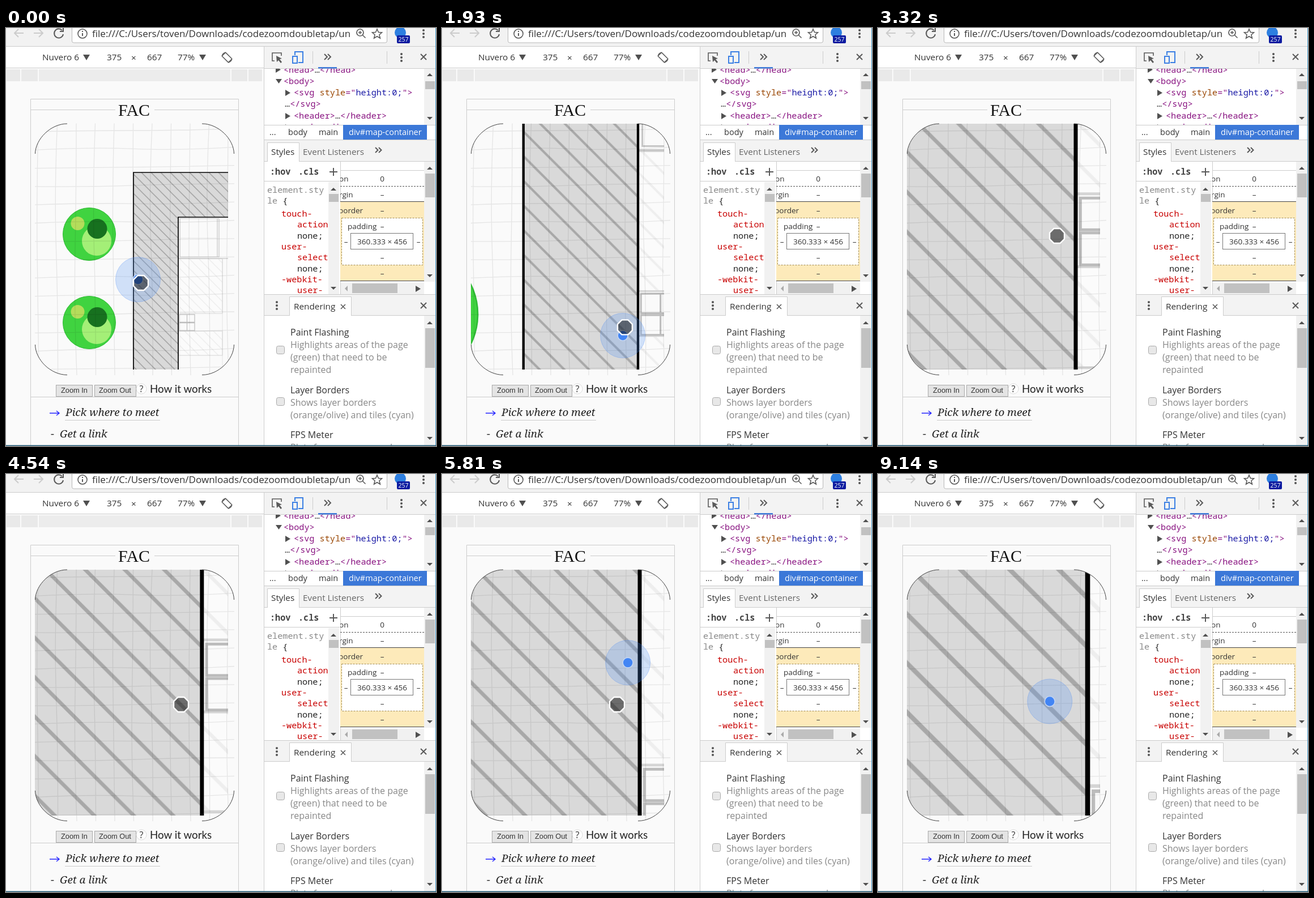
Animation, 759 px wide and 738 px high, one loop 9.17 s. Source, as an HTML page:

```html
<!DOCTYPE html>
<html lang="en">
<head>
<meta charset="utf-8">
<title>Map zoom</title>
<style>
  html, body { margin: 0; width: 100%; height: 100%; overflow: hidden; }
  svg { display: block; }
  text { font: 16px "Open Sans", sans-serif; fill: #333; }
  .bar text { font-size: 15.3px; }
  .url { font-size: 17px; }
  .crumb text { font-size: 14.5px; }
  .code text { font: 15.2px "Noto Sans Mono", monospace; fill: #222; }
  .code .tag { fill: #881280; }
  .code .attr { fill: #994500; }
  .code .value { fill: #1a1aa6; }
  .code .prop { fill: #c80000; }
  .code .dim { fill: #888; }
  .code .bold { font-weight: bold; fill: #444; }
  .box text { font-size: 13.5px; }
  .mid { text-anchor: middle; }
  .note text { fill: #888; }
  .button { font: 12.8px "Liberation Sans", sans-serif; }
  .step { font: italic 18.8px "Noto Serif", serif; fill: #222; }
  .line { fill: none; stroke: #ccc; }
  .icon { fill: none; stroke: #5a5a5a; stroke-width: 2; }
  .thumb { fill: #c1c1c1; }
  .tri { fill: #505050; }
</style>
</head>
<body>
<svg width="759" height="738" viewBox="0 0 759 738">
  <defs>
    <clipPath id="frame"><rect x="51" y="168.5" width="352" height="444.5" rx="60"/></clipPath>
    <clipPath id="sheet"><rect x="51" y="169" width="341" height="434"/></clipPath>
    <clipPath id="tree"><rect x="456" y="72" width="282" height="99"/></clipPath>
    <clipPath id="rules"><rect x="456" y="236" width="133" height="234"/></clipPath>
    <clipPath id="model"><rect x="590" y="236" width="148" height="212"/></clipPath>
    <path id="strokes" d="M-5-6L30 29M-5 11L30 46M-5-23L30 12"/>
    <pattern id="hatch" width="17" height="17" patternUnits="userSpaceOnUse">
      <rect width="17" height="17" fill="#d9d9d9"/>
      <use href="#strokes" stroke="#a8a8a8" stroke-width="1.6"/>
    </pattern>
    <pattern id="paleHatch" width="17" height="17" patternUnits="userSpaceOnUse">
      <rect width="17" height="17" fill="#fbfbfb"/>
      <use href="#strokes" stroke="#eee" stroke-width="1.5"/>
    </pattern>
    <g id="plant">
      <circle r="46.5" fill="#40d340" stroke="#2fba35"/>
      <circle cx="13" cy="12" r="26" fill="#a4ef77"/>
      <circle cx="14" cy="-9.5" r="17.5" fill="#17711f"/>
      <circle cx="-20.5" cy="-19" r="12" fill="#b4dd5b"/>
    </g>
    <g id="table">
      <rect width="20.3" height="33.9" rx="4" fill="#161b14"/>
      <rect x="2.2" y="2.9" width="16.1" height="29" rx="3.4" fill="#8b4d36"/>
    </g>
    <path id="up" class="tri" d="M-5 3h10l-5-5z"/>
    <path id="down" class="tri" d="M-5-3h10l-5 5z"/>
    <path id="right" class="tri" d="M-5-5v11l9-5.5z"/>
    <path id="cross" class="icon" d="M-5-5L5 5M5-5L-5 5"/>
    <g id="dots" fill="#555"><circle cy="-6" r="2"/><circle r="2"/><circle cy="6" r="2"/></g>
    <rect id="check" x="0.5" y="0.5" width="14" height="14" rx="3" fill="#e8e8e8" stroke="#aaa"/>
  </defs>

  <rect width="759" height="738" fill="#fafafa"/>

  <!-- browser bar -->
  <rect width="759" height="33" fill="#f2f2f2"/>
  <path class="line" d="M0 32.5H759"/>
  <rect x="116.500" y="-5" width="556" height="31" rx="3" fill="#fff" stroke="#b8b8b8"/>
  <g class="icon">
    <path stroke="#ccc" d="M31 9H15M22 2L15 9l7 7M49 9H65M58 2l7 7-7 7"/>
    <path d="M99 4A8 8 0 1 0 101 11M101 0V6H95"/>
    <circle cx="135" cy="10" r="8" stroke-width="1.6"/><path d="M135 9v5M135 5v2"/>
    <circle cx="625" cy="8" r="6" stroke-width="1.7"/><path d="M629.500 12.500l5 5M622 8h6M625 5v6" stroke-width="1.5"/>
    <path stroke-width="1.600" d="M655 2l2.500 5.500 6 .5-4.600 4 1.500 6-5.400-3.200-5.400 3.200 1.500-6-4.600-4 6-.5z"/>
  </g>
  <text class="url" x="152" y="16">file:///C:/Users/toven/Downloads/codezoomdoubletap/un</text>
  <circle cx="696" cy="8" r="10" fill="#2d7fe0"/>
  <rect x="690" y="13" width="23" height="14" rx="2" fill="#0b1ba0"/>
  <text class="mid" x="701.500" y="24" style="font-size:10.500px;fill:#fff">257</text>
  <use href="#dots" x="737" y="10"/>

  <!-- device bar -->
  <g class="bar">
    <rect y="33" width="455" height="38" fill="#fff"/>
    <path class="line" d="M0 70.500H455"/>
    <text x="64" y="57">Nuvero 6</text><path class="tri" d="M136 47h12l-6 10z"/>
    <text x="178" y="57">375</text><text x="221" y="58">×</text><text x="249" y="57">667</text>
    <text x="303" y="57">77%</text><path class="tri" d="M341 47h12l-6 10z"/>
    <g class="icon" stroke-width="1.400">
      <rect x="385.500" y="44" width="9" height="16" rx="1" transform="rotate(-45 390 52)" stroke-width="1.500"/>
      <path stroke-width="1.300" d="M381 50a9 9 0 0 1 7-7M399 54a9 9 0 0 1-7 7"/>
    </g>
  </g>
  <path fill="#e9e9e9" d="M1 73h24v21H1zM27 73h29v21H27zM398 73h28v21H398zM428 73h24v21H428z"/>
  <path fill="#ececec" d="M58 73H396V94H58z"/>

  <!-- page -->
  <path class="line" stroke="#d8d8d8" d="M43.500 738V125.500H410.500V738M43 144.500H193M262 144.500H410M43 651.500H410"/>
  <text x="198" y="155" style="font:30px 'Liberation Serif',serif;fill:#111">FAC</text>

  <g clip-path="url(#frame)">
    <g clip-path="url(#sheet)">
      <g id="world">
        <g fill="none" stroke="#d5d5d5" stroke-width="1.200">
          <g fill="url(#paleHatch)">
            <path d="M304 407.500H382V504H304M304 535H382V578H304M304 621H382V800H304"/>
          </g>
          <path stroke="#c6c6c6" d="M304 406.800H410M307 336.500V404H376V336.500zM373 336.500V404"/>
          <path stroke="#ddd" stroke-width=".8" d="M307 371H373M340 337V404M382 407V621"/>
          <path stroke="#bcbcbc" d="M306 505.800H333V519.300H306zM306 520.600H333V534.200H306zM319.500 506V534"/>
        </g>
        <path d="M225 255H600V334H304V900H225z" fill="url(#hatch)" stroke="#000" stroke-width="1.700"/>
        <use href="#plant" x="147" y="364"/><use href="#plant" x="147" y="520"/>
        <use href="#table" x="409.800" y="483.100"/><use href="#table" x="409.800" y="526.500"/>
      </g>
    </g>
    <path id="grid" fill="none" stroke="#000" stroke-opacity=".085" stroke-width="1.300"/>
    <g id="marker">
      <circle r="39.500" fill="#4c8df0" fill-opacity=".24" stroke="#4285f4" stroke-opacity=".3"/>
      <circle r="9" fill="#4285f4" stroke="#c3d5f3" stroke-width="1.600"/>
    </g>
  </g>
  <path fill="none" stroke="#444" d="M51.500 222C52 196 79 169 108 169M346 169C375 169 402 196 402.500 222M402.500 559C402 586 375 612.500 346 612.500M108 612.500C79 612.500 52 586 51.500 559"/>

  <g fill="#e4e4e4" stroke="#aaa">
    <rect x="88.500" y="630.500" width="64" height="20"/><rect x="156.500" y="630.500" width="73" height="20"/>
  </g>
  <text class="button" x="97" y="644">Zoom In</text><text class="button" x="164" y="644">Zoom Out</text>
  <circle cx="239" cy="637" r="9" fill="#fff" stroke="#ddd"/>
  <text class="mid" x="239" y="643">?</text>
  <text x="254" y="644" style="font:18.800px Lato,sans-serif;fill:#222">How it works</text>
  <path d="M77 680H94M89 676l5 4-5 4" fill="none" stroke="#22f" stroke-width="1.400"/>
  <text class="step" x="105" y="685">Pick where to meet</text><path class="line" d="M104 692.500H272"/>
  <text class="step" x="79" y="723" style="font-style:normal">-</text>
  <text class="step" x="95" y="723">Get a link</text>

  <!-- inspector -->
  <rect x="455" y="33" width="304" height="705" fill="#fff"/>
  <path fill="#f3f3f3" d="M455 33H759V71H455zM455 198H759V235H455zM455 471H759V507H455z"/>
  <path class="line" d="M455.500 33V738M455 71.500H759M455 171.500H759M455 197.500H759M455 235.500H759M455 470.500H759M455 507.500H759M541.500 41V63M672.500 41V63M590.500 236V470"/>
  <g class="icon">
    <path d="M474 58H470V44H486V49" stroke-width="1.600"/><path d="M477 49l10 5-4 1 4 5-2 2-4-5-3 3z" fill="#5a5a5a" stroke="none"/>
    <path stroke="#3c80e4" d="M510 48V42H524V61H516M506 50h8v12h-8z"/>
    <path d="M562 46l5 5-5 5M568 46l5 5-5 5M652 211l4.500 4.500-4.500 4.500M658 211l4.500 4.500-4.500 4.500"/>
    <path d="M571 254H585M578 247V261"/>
  </g>
  <path fill="#3c78d8" d="M551 69h33v2.500h-33zM595 171h148v26H595z"/>
  <use href="#dots" x="698" y="52"/><use href="#cross" x="737" y="51"/>

  <g class="code" clip-path="url(#tree)">
    <g class="tri">
      <use href="#right" x="481" y="73"/><path class="tri" d="M476 90h11l-5.500 8z"/>
      <use href="#right" x="498" y="114"/><use href="#right" x="498" y="155"/><use href="#right" x="498" y="175"/>
    </g>
    <text class="tag" x="490" y="79">&lt;head&gt;<tspan fill="#333">…</tspan>&lt;/head&gt;</text>
    <text class="tag" x="490" y="99">&lt;body&gt;</text>
    <text class="tag" x="508" y="119">&lt;svg <tspan class="attr">style</tspan>="<tspan class="value">height:0;</tspan>"&gt;</text>
    <text class="tag" x="492" y="139"><tspan fill="#333">…</tspan>&lt;/svg&gt;</text>
    <text class="tag" x="508" y="160">&lt;header&gt;<tspan fill="#333">…</tspan>&lt;/header&gt;</text>
    <text class="tag" x="508" y="180">&lt;main&gt;&lt;div&gt;</text>
  </g>
  <g class="crumb">
    <text x="465" y="189">...</text><text x="498" y="189">body</text><text x="552" y="189">main</text>
    <text x="605" y="189" style="fill:#fff">div#map-container</text>
  </g>
  <g class="bar">
    <path d="M461.500 236V202.500H517.500V236" fill="#fff" stroke="#ccc"/>
    <text x="468" y="224">Styles</text><text x="524" y="224" style="fill:#666">Event Listeners</text>
  </g>
  <g class="code" clip-path="url(#rules)">
    <text class="bold" x="466" y="259">:hov</text><text class="bold" x="516" y="259">.cls</text>
    <path class="line" d="M455 270.500H590"/>
    <text class="dim" x="461" y="291">element.sty</text>
    <text class="dim" x="461" y="310">le <tspan fill="#222">{</tspan></text>
    <text class="prop" x="486" y="333">touch-</text><text class="prop" x="514" y="352">action</text>
    <text x="514" y="372">none;</text>
    <text class="prop" x="486" y="391">user-</text><text class="prop" x="514" y="410">select</text>
    <text x="514" y="430">none;</text>
    <text class="prop" x="486" y="449">-webkit-</text><text class="prop" x="514" y="468">user-</text>
  </g>

  <g class="box" clip-path="url(#model)">
    <path fill="#fdeaba" d="M590 307H738V446H590z"/>
    <path fill="none" stroke="#444" d="M590 306.500H738M590 446.500H738"/>
    <path fill="none" stroke="#555" stroke-dasharray="3 2" d="M590 279.500H738"/>
    <path class="line" d="M590 251.500H738"/>
    <rect x="592.500" y="335.500" width="143" height="83" fill="#fff" stroke="#a08a50" stroke-dasharray="3 2"/>
    <rect x="608.500" y="362.500" width="110" height="28" fill="#fff" stroke="#777"/>
    <text x="588" y="271">on</text><text x="588" y="299">rgin</text>
    <text x="587" y="327">border</text><text x="603" y="355">padding</text>
    <g class="mid">
      <text x="664" y="271">0</text><text x="664" y="299">–</text><text x="664" y="327">–</text>
      <text x="664" y="355">–</text><text x="664" y="382">360.333 × 456</text>
      <text x="600" y="382">–</text><text x="728" y="382">–</text>
      <text x="664" y="410">–</text><text x="664" y="438">–</text>
    </g>
  </g>

  <path fill="#f1f1f1" d="M738 72h20v99h-20zM738 236h20v212h-20zM738 508h20v229h-20zM569 272h19v198h-19zM591 450h147v20H591z"/>
  <path class="thumb" d="M740 94h17v14h-17zM740 257h17v42h-17zM740 530h17v70h-17zM570 293h17v14h-17zM611 451h80v17h-80z"/>
  <use href="#up" x="748" y="82"/><use href="#down" x="748" y="160"/>
  <use href="#up" x="748" y="247"/><use href="#down" x="748" y="438"/>
  <use href="#up" x="748" y="520"/><use href="#down" x="748" y="725"/>
  <use href="#up" x="578" y="284"/><use href="#down" x="578" y="460"/>
  <path fill="#aaa" d="M603 455v10l-5-5z"/><use href="#right" x="728" y="460"/>

  <!-- rendering drawer -->
  <use href="#dots" x="478" y="490"/>
  <path d="M500.500 508V474.500H609.500V508" fill="#fff" stroke="#ccc"/>
  <g class="bar"><text x="508" y="497">Rendering</text></g>
  <use href="#cross" transform="translate(595 492) scale(.8)"/><use href="#cross" x="737" y="490"/>
  <use href="#check" x="477" y="561"/><use href="#check" x="477" y="652"/>
  <text x="502" y="543">Paint Flashing</text>
  <text x="502" y="645">Layer Borders</text>
  <text x="502" y="724">FPS Meter</text>
  <g class="note">
    <text x="502" y="565">Highlights areas of the page</text>
    <text x="502" y="587">(green) that need to be</text>
    <text x="502" y="609">repainted</text>
    <text x="502" y="667">Shows layer borders</text>
    <text x="502" y="689">(orange/olive) and tiles (cyan)</text>
    <text x="502" y="746">Plots frames per second</text>
  </g>
  <path fill="none" stroke="#4a9fd0" d="M758.500 0V738"/>
  <path fill="none" stroke="#245d78" stroke-width="1.500" d="M0 737.300H759"/>

  <g id="cursor">
    <circle r="13" fill="#000" fill-opacity=".5"/>
    <path d="M-5.500-13H5.500L13-5.500V5.500L5.500 13H-5.500L-13 5.500V-5.500z" fill="none" stroke="#fff" stroke-width="2.400"/>
  </g>
</svg>
<script>
  const LOOP = 9170, PIVOT = [304, 505];
  // time, screen x and y of the pivot, scale
  const view = [
    [80, 304, 505, 1], [450, 346.6, 541.6, 1.6],
    [760, 346.6, 541.6, 1.6], [1790, 346, 467, 2.56],
    [2460, 346, 467, 2.56], [3320, 349, 297, 4.15], [3370, 349, 297, 4.1],
    [4540, 349, 297, 4.1], [4710, -190, 297, 4.1],
    [5060, -190, 297, 4.1], [5110, -190, 252, 4.1], [5290, -190, 72, 4.1],
    [5570, -190, 72, 4.1], [5810, 349, 518, 4.1],
    [6980, 349, 518, 4.1], [7530, 364, 545, 4.65], [7880, 370, 556, 5.1]
  ];
  // time, x, y
  const pointer = [
    [80, 238, 450], [450, 324, 548], [1880, 324, 548], [1930, 323, 529],
    [2090, 307, 430], [2270, 335, 337], [2460, 335, 337], [3320, 316, 367],
    [3420, 316, 367], [3860, 309, 407], [7880, 309, 407], [7910, 329, 476], [8240, 672, 740]
  ];
  // time of a tap, world x and y
  const taps = [[0, 233, 444], [760, 293.5, 534.7], [2460, 298.9, 459.9], [6980, 290.9, 474.7]];

  const byId = id => document.getElementById(id);
  const move = (id, x, y, rest = '') => byId(id).setAttribute('transform', `translate(${x} ${y})${rest}`);

  function sample(keys, t) {
    const i = keys.findIndex(k => k[0] > t);
    if (i === 0) return keys[0].slice(1);
    if (i < 0) return keys.at(-1).slice(1);
    const a = keys[i - 1], b = keys[i], p = (t - a[0]) / (b[0] - a[0]);
    return a.slice(1).map((v, n) => v + (b[n + 1] - v) * p);
  }

  function gridPath() {
    let d = '';
    for (let i = 0; i < 14; i++) {
      const y = 181 + i * 32.3, bend = 3 * Math.sin(i * 1.7);
      d += `M51 ${y + 2}Q150 ${y - bend} 227 ${y}T403 ${y - 3}`;
    }
    for (let i = 0; i < 11; i++) {
      const x = 54 + i * 33.5, bend = 3 * Math.sin(i * 2.3);
      d += `M${x + 3} 168Q${x - bend} 290 ${x + 1} 390T${x + 4} 613`;
    }
    return d;
  }

  function draw() {
    const t = performance.now() % LOOP;
    const [x, y, scale] = sample(view, t);
    move('world', x, y, ` scale(${scale}) translate(${-PIVOT[0]} ${-PIVOT[1]})`);
    const [, tapX, tapY] = taps.findLast(tap => tap[0] <= t);
    move('marker', x + scale * (tapX - PIVOT[0]), y + scale * (tapY - PIVOT[1]));
    move('cursor', ...sample(pointer, t));
    byId('cursor').style.visibility = t < 8240 ? 'visible' : 'hidden';
    requestAnimationFrame(draw);
  }

  byId('grid').setAttribute('d', gridPath());
  draw();
</script>
</body>
</html>
```
